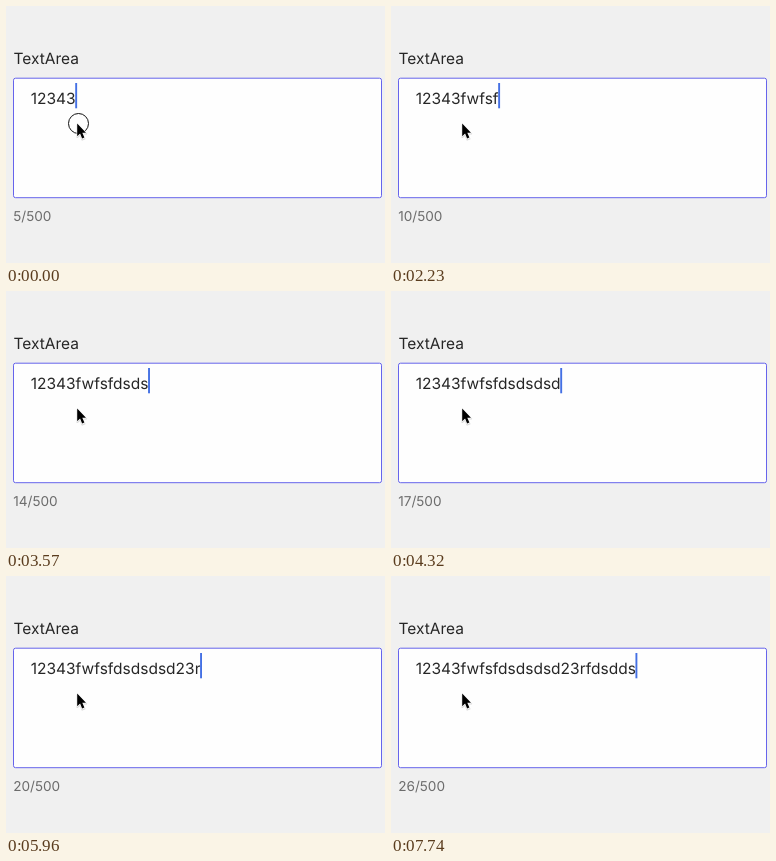
Animation, 379 px wide and 257 px high, one loop 8 s. Source, as an HTML page:

```html
<!DOCTYPE html>
<html lang="en">
<head>
<meta charset="utf-8">
<title>TextArea</title>
<style>
  html, body { margin: 0; width: 100%; height: 100%; overflow: hidden; background: #f0f0f0; }
  svg { display: block; width: 379px; height: 257px; }
  text {
    font-family: Inter, "Liberation Sans", sans-serif; font-size: 15.5px; font-weight: 420;
    fill: #262626; white-space: pre; text-rendering: geometricPrecision;
  }
  #count { font-size: 13.6px; fill: #6c6c6c; }
</style>
</head>
<body>
<svg viewBox="0 0 379 257">
  <rect width="379" height="257" fill="#f0f0f0"/>
  <text x="7.5" y="57.8">TextArea</text>
  <rect x="7.5" y="72.2" width="368" height="119.5" rx="2" fill="#fefefe" stroke="#6664ec"/>
  <text id="value" x="24.7" y="98.1"></text>
  <rect id="caret" y="77" width="1.9" height="25.3" fill="#4470e4"/>
  <text id="count" x="7.2" y="214.7"></text>
  <circle id="ring" cx="72.5" cy="117.5" r="10" fill="#fefefe" stroke="#111"/>
  <path d="M71.2 119V131.3L74.1 128.8L76.2 133.8L78.6 132.8L76.4 127.8H80.4Z"
        fill="#000" stroke="#000" stroke-width="1.6" stroke-linejoin="round" opacity=".14"/>
  <path d="M71.2 117.6V130.2L74.1 127.6L76.1 132.6L78.4 131.6L76.3 126.8H80Z"
        fill="#000" stroke="#fff" stroke-width="1.3" paint-order="stroke" stroke-linejoin="round"/>
</svg>
<script>
  const LOOP = 8000;
  const START = "12343";
  const TYPED = "fwfsfdsdsdsd23rfdsdds";
  // When each typed character appears, in ms
  const KEYS = [590, 1040, 1490, 1780, 2230, 2530, 2980, 3270, 3570, 3870, 4170, 4320,
                5510, 5660, 5960, 6560, 6860, 7150, 7300, 7590, 7740];

  const el = id => document.getElementById(id);
  const value = el("value"), caret = el("caret"), count = el("count"), ring = el("ring");
  const left = +value.getAttribute("x");

  function caretOpacity(t) {
    if (t < 4920 || t >= 5370) return 1;
    return t < 5220 ? 0 : 0.5;
  }

  function draw(t) {
    const text = START + TYPED.slice(0, KEYS.filter(k => k <= t).length);
    value.textContent = text;
    count.textContent = text.length + "/500";
    caret.setAttribute("x", left + value.getComputedTextLength() - 0.4);
    caret.setAttribute("opacity", caretOpacity(t));
    ring.setAttribute("visibility", t < 140 ? "visible" : "hidden");
  }

  const begin = performance.now();
  function tick() {
    draw((performance.now() - begin) % LOOP);
    requestAnimationFrame(tick);
  }
  tick();
</script>
</body>
</html>
```
